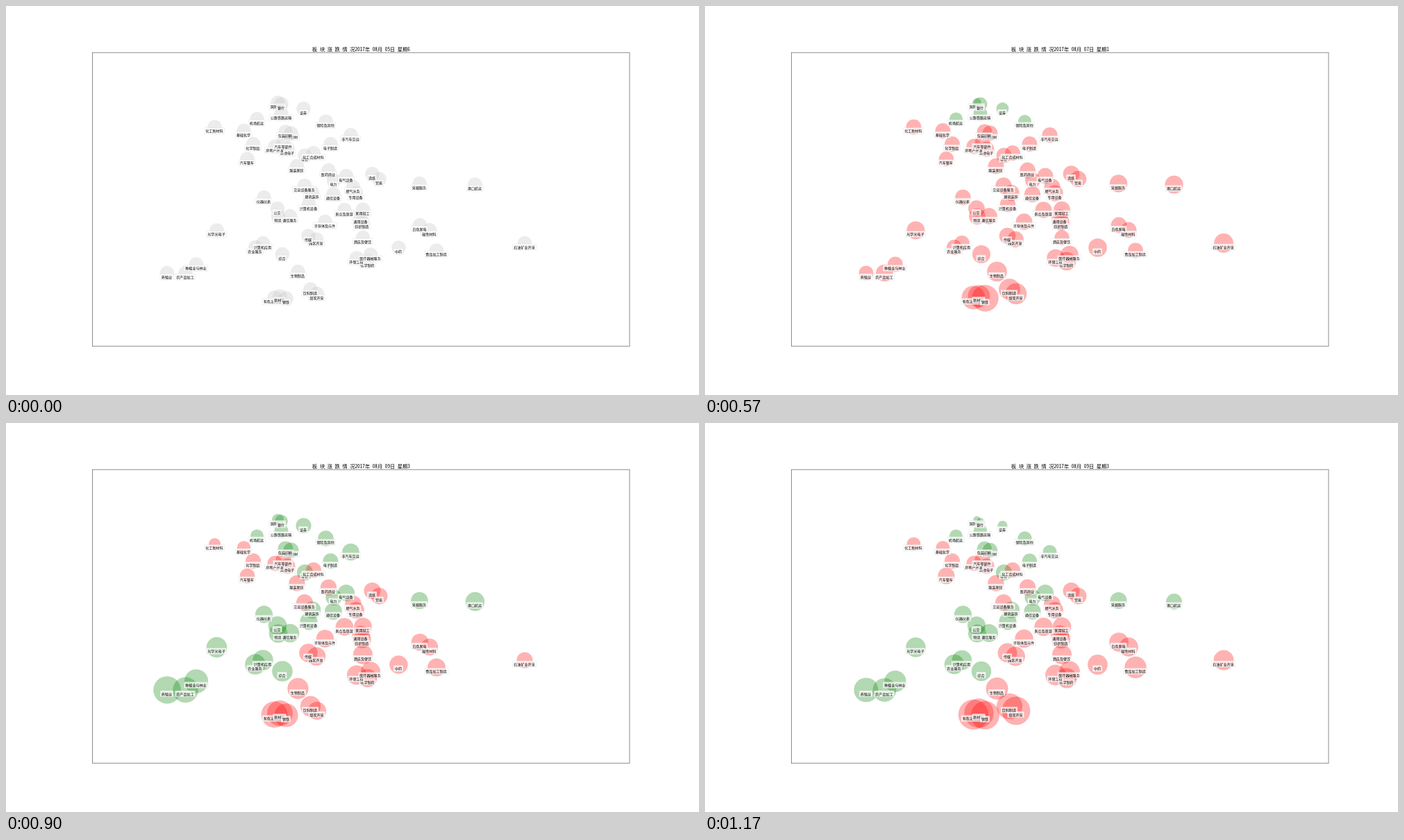
An HTML page for the animation above (1.5 s loop, 998 px wide and 561 px high).

```html
<!DOCTYPE html>
<html>
<head>
<meta charset="utf-8">
<style>
  html, body { margin: 0; width: 100%; height: 100%; overflow: hidden; background: #fff; }
  svg { display: block; width: 998px; height: 561px; }
  text { text-anchor: middle; fill: #000; white-space: pre; }
  .title { font: 7.23px "Noto Sans Mono CJK SC", "Noto Sans CJK SC", "Noto Sans CJK", monospace; }
  .label { font: 5.1px "Noto Sans CJK SC", "Noto Sans CJK", sans-serif; }
</style>
</head>
<body>
<svg viewBox="0 0 998 561">
  <rect x="124.5" y="67.2" width="773.5" height="423.5" fill="none" stroke="#808080" stroke-width=".9"/>
  <text class="title" x="511.5" y="64.6"></text>
  <g id="discs" fill-opacity=".3"></g>
  <g id="labels"></g>
</svg>
<script>
const STEP = 30, LOOP = 1500, STEPS_PER_DAY = 10, START_RADIUS = 10.3, FONT = 5.1;
const COLORS = { r: '#f00', g: '#008000' };
const IDLE_COLOR = '#c0c0c0';
const IDLE_DATE = '05日 星期6';
const DATES = ['07日 星期1', '08日 星期2', '09日 星期3'];

const title = document.querySelector('.title');
const discs = document.getElementById('discs');
const labels = document.getElementById('labels');
const sectors = [];

function make(parent, tag, attrs) {
  const node = document.createElementNS('http://www.w3.org/2000/svg', tag);
  for (const key in attrs) node.setAttribute(key, attrs[key]);
  return parent.appendChild(node);
}

// trend: one colour key per day; radii: disc radius at the end of each day
function add(trend, radii, list) {
  for (const item of list.split(', ')) {
    const [name, x, y] = item.split(' ');
    const disc = make(discs, 'circle', { cx: x, cy: y });
    const width = name.length * FONT + 3.6;
    make(labels, 'rect', {
      x: x - .5 - width / 2, y: +y + 1.1, width, height: 9, rx: .6,
      fill: '#fff', 'fill-opacity': .75, stroke: '#ccc', 'stroke-opacity': .6, 'stroke-width': .5
    });
    make(labels, 'text', { class: 'label', x: x - .5, y: +y + 7.5 }).textContent = name;
    sectors.push({ disc, trend, areas: [START_RADIUS, ...radii].map(r => r * r) });
  }
}

add('rrr', [17.5, 19, 22], '有色冶炼加工 386.5 420.5');
add('rrr', [16.5, 18.5, 21.5], '新材料 394.5 418.5');
add('rgr', [20, 17.1, 20.8], '钢铁 403.5 421.5');
add('rgr', [15.8, 13, 21.2], '煤炭开采 448 415');
add('rgr', [15.8, 14.7, 19], '饮料制造 438.5 408.5');
add('rrr', [14.7, 15.2, 16], '生物制品 420.5 383');
add('rrg', [10.5, 19.8, 17.3], '养殖业 232 385');
add('rrg', [12.5, 18.4, 16.8], '农产品加工 258.5 385');
add('rrg', [11, 17.2, 15.4], '种植业与林业 274 372.5');
add('rrg', [11, 14.8, 14.2], '农业服务 359 348, 计算机应用 370 342');
add('rrg', [13.3, 14.8, 14.2], '综合 398 358, 光学光电子 303.5 323.5');
add('rgr', [13.6, 13.2, 14.5], '化学制药 521 368, 中药 565.5 348.5');
add('rrr', [13, 14, 15], '环保工程 505 363.5, 医疗器械服务 525 358.5');
add('rrr', [11, 13, 16], '食品加工制造 620 352.5');
add('rgr', [14.3, 11.5, 14.8], '石油矿业开采 747 342');
add('rrr', [10.7, 14, 14], '酒店及餐饮 514 334');
add('rrr', [12, 13.3, 14], '园区开发 447 336.5, 传媒 435.5 331.5');
add('rrr', [11.5, 12.3, 14], '磁性材料 610 323, 白色家电 596 316');
add('rrr', [12, 12.8, 13.3],
  '半导体及元件 459.5 311, 纺织制造 513 312, 通用设备 511 305, 家用轻工 514 293.5, 景点及旅游 487.5 294');
add('rrg', [12, 13.3, 13], '通信服务 409 303, 物流 392 303.5, 公交 391 292');
add('rrg', [11.3, 12.5, 12.5], '计算机设备 436 286, 仪器仪表 371.5 276');
add('rrg', [11.8, 12.3, 12], '通信设备 471.5 271.5, 建筑装饰 441 269.5');
add('rrr', [11.8, 12, 12], '专用设备 504 270, 燃气水务 500 261, 交运设备服务 430 259');
add('rrg', [13.4, 13.7, 11.2], '港口航运 675.5 257.5');
add('rgg', [13, 12.3, 12], '采掘服务 595.5 256');
add('rrg', [11, 11.6, 11.6], '电力 472 251.5, 零售 430.5 215.5');
add('rgr', [12, 12, 12], '贸易 537.5 249.5, 造纸 527.5 242');
add('rgg', [11.5, 12, 12], '电气设备 490 245');
add('rgr', [11.5, 11.6, 11.7], '医药商业 464.5 237, 服装家纺 419 231');
add('rgr', [10.7, 10.8, 12.2], '汽车整车 347.5 220.5');
add('rgr', [11, 11, 11], '化工合成材料 443 212');
add('rrr', [11, 11, 11], '其他电子 405.5 206.5');
add('rgr', [11, 11, 11], '房地产开发 387.5 202.5, 汽车零部件 399.5 197, 化学制品 356 199');
add('rgg', [11, 11, 10.6], '电子制造 467.5 199, 其他建材 410.5 183.5, 包装印刷 402.5 181.5');
add('rrg', [11.2, 12.3, 9.8], '非汽车交运 496.5 186');
add('rgr', [11, 9.8, 10], '基础化学 342.5 180');
add('rgr', [11, 8.6, 10], '化工新材料 300.5 174.5');
add('grg', [9.4, 11.3, 10], '保险及其他 460.5 166.5');
add('ggg', [9.5, 9.5, 9.5], '机场航运 361.5 163');
add('grg', [10, 10, 9.6], '公路铁路运输 396.5 155.5');
add('grg', [8.8, 11.1, 6.5], '证券 428.5 148');
add('grg', [5.8, 8.6, 4.6], '国防军工 391.5 139.5');
add('ggg', [10, 9.3, 4], '银行 396.5 141.5');

function draw(time) {
  const lastStep = DATES.length * STEPS_PER_DAY - 1;
  const step = Math.min(Math.floor(time % LOOP / STEP) - STEPS_PER_DAY, lastStep);
  const idle = step < 0;
  const day = Math.max(0, Math.floor(step / STEPS_PER_DAY));
  const progress = idle ? 0 : step % STEPS_PER_DAY / STEPS_PER_DAY;

  title.textContent = '板 块 涨 跌 情 况2017年 08月 ' + (idle ? IDLE_DATE : DATES[day]);
  for (const { disc, trend, areas } of sectors) {
    const area = areas[day] + (areas[day + 1] - areas[day]) * progress;
    disc.setAttribute('r', Math.sqrt(area).toFixed(2));
    disc.setAttribute('fill', idle ? IDLE_COLOR : COLORS[trend[day]]);
  }
}

const start = performance.now();
function tick() {
  draw(performance.now() - start);
  requestAnimationFrame(tick);
}
tick();
</script>
</body>
</html>
```
